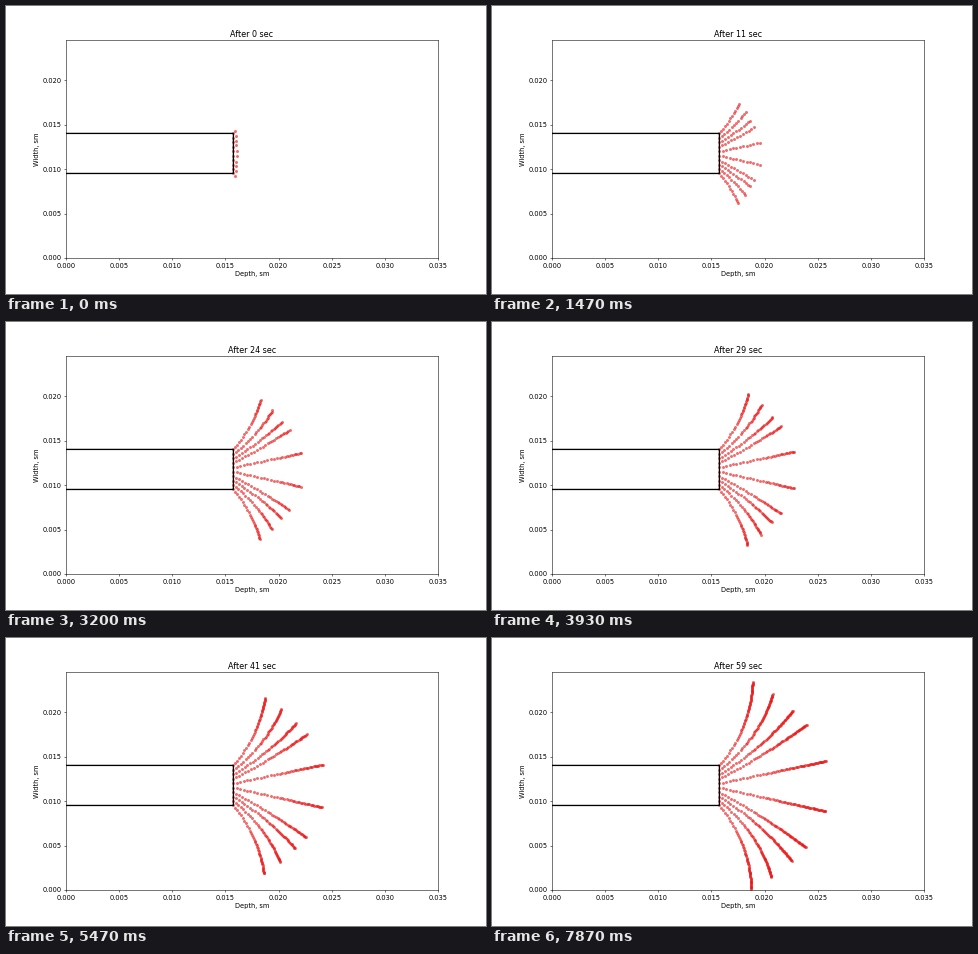
These frames come from a looping animation (480 by 288 pixels, 8 s). A matplotlib script:

```python
import numpy as np
import matplotlib.pyplot as plt
from matplotlib.animation import FuncAnimation

FRAMES = 60
LOOP_MS = 8000
TIP = 15.75            # tube end; lengths here are in thousandths of an axis unit
LOW, HIGH = 9.5, 14.0  # tube walls
START_SPEED = .33
LEAN = .8              # degrees the lower particles turn further outward

# First heading, last heading (degrees), braking power; outermost pair first
RAYS = [(55, 88, 1), (43, 76, 1), (36, 56, 1), (32, 41, 1.2), (14, 14, 1.3)]


def track(y, side, first, last, brake):
    """Fly off at constant speed, then brake while turning outward."""
    pos, gone = np.array([TIP, y]), 0
    points = [pos]
    for _ in range(FRAMES):
        speed = min(START_SPEED, .098 * (9 / max(gone, 1)) ** brake)
        turn = np.radians(first + (last - first) * (gone + speed / 2) / 10)
        pos = pos + speed * np.array([np.cos(turn), side * np.sin(turn)])
        gone += speed
        points.append(pos)
    return points


paths = []
for i, (first, last, brake) in enumerate(RAYS):
    paths.append(track(HIGH - .5 * i, 1, first, last, brake))
    paths.append(track(LOW + .5 * i, -1, first + LEAN, last + LEAN, brake))
# Axes: step, particle, coordinate
tracks = np.swapaxes(paths, 0, 1) / 1000

fig = plt.figure(figsize=(10, 6), dpi=48, facecolor="white")
ax = fig.add_axes([.125, .125, .775, .757])
ax.set_xlim(0, .035)
ax.set_ylim(0, .0245)
ax.set_xticks(np.arange(8) * .005)
ax.set_yticks(np.arange(5) * .005)
ax.xaxis.set_major_formatter("{x:.3f}")
ax.yaxis.set_major_formatter("{x:.3f}")
ax.set_xlabel("Depth, sm")
ax.set_ylabel("Width, sm")
title = ax.set_title("After 0 sec", pad=5.2)

tube = np.array([(0, HIGH), (TIP, HIGH), (TIP, LOW), (0, LOW)]) / 1000
ax.plot(tube[:, 0], tube[:, 1], color="black", lw=2,
        solid_joinstyle="miter", snap=False)
dots = ax.scatter([], [], s=20, color="#e81414", alpha=.62, linewidths=0)


def update(sec):
    dots.set_offsets(tracks[:sec + 2].reshape(-1, 2))
    title.set_text(f"After {sec} sec")
    return dots, title


anim = FuncAnimation(fig, update, frames=FRAMES, interval=LOOP_MS / FRAMES,
                     init_func=lambda: update(0), repeat=True, repeat_delay=0)
plt.show()
```
